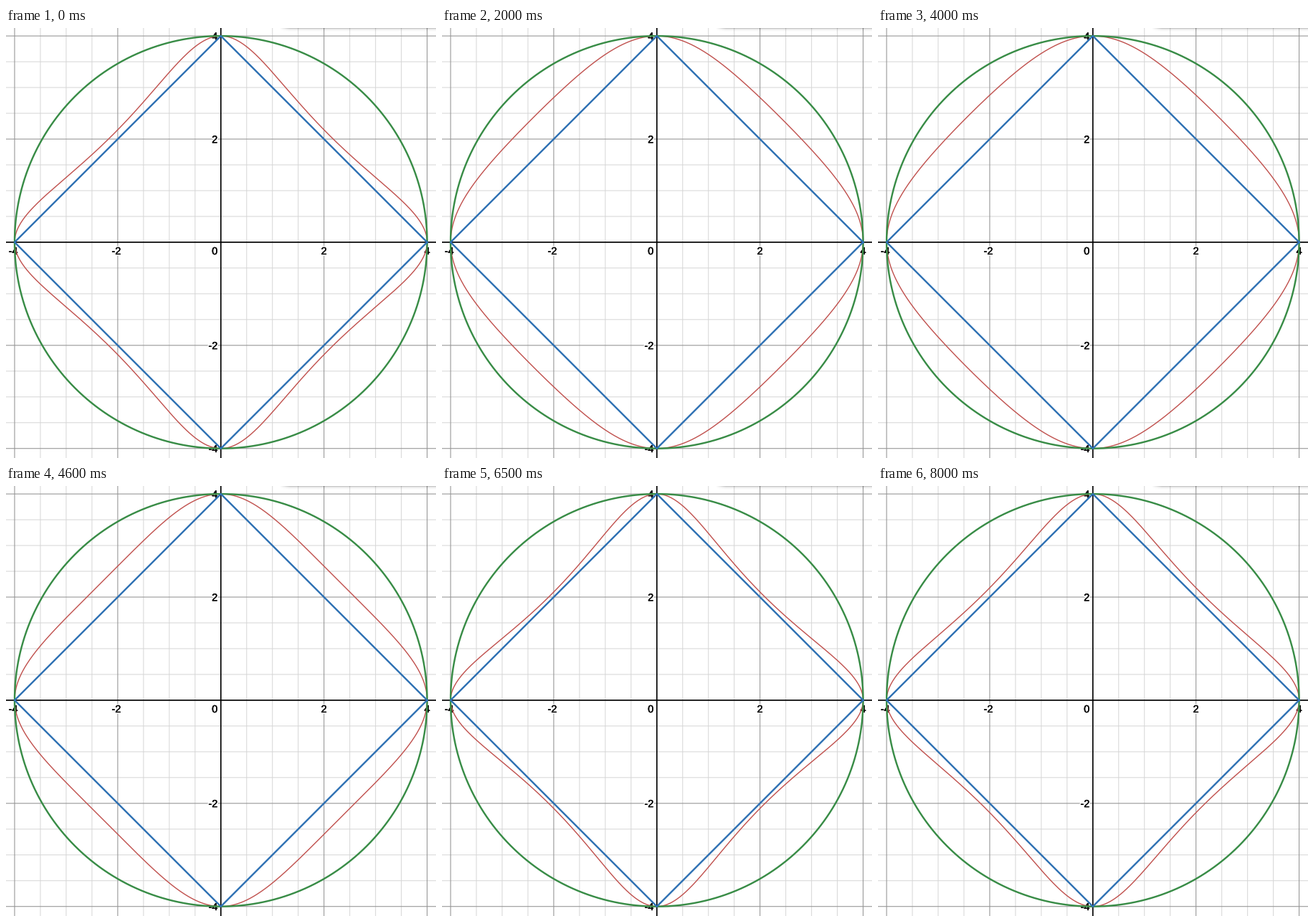
These frames come from a looping animation (600 by 600 pixels, 8100 ms). A matplotlib script:

```python
import numpy as np
import matplotlib.pyplot as plt
from matplotlib.animation import FuncAnimation
from matplotlib.patheffects import Normal, Stroke

SIZE, DPI = 600, 100
CX, CY, UNIT = 299.8, 298.9, 71.95
FRAMES, STEP_MS = 81, 100
PERIOD, ZERO_AT, K_MAX = 8.0, 3.05, 0.5
PX = 72 / DPI
THETA = np.linspace(0, 2 * np.pi, 721)

fig = plt.figure(figsize=(SIZE / DPI, SIZE / DPI), dpi=DPI, facecolor="white")
ax = fig.add_axes([0, 0, 1, 1])
ax.set(xlim=(0, SIZE), ylim=(SIZE, 0))
ax.axis("off")


def sx(x):
    return CX + UNIT * np.asarray(x)


def sy(y):
    return CY - UNIT * np.asarray(y)


def draw(xs, ys, color, width, z):
    line, = ax.plot(xs, ys, color=color, lw=width * PX, zorder=z, snap=False,
                    solid_joinstyle="round")
    return line


def rule(value, color, width, z):
    draw([sx(value)] * 2, [0, SIZE], color, width, z)
    draw([0, SIZE], [sy(value)] * 2, color, width, z)


def label(x, y, text, align="center"):
    ax.text(x, y, text, ha=align, va="center_baseline", color="black", zorder=4,
            family="Liberation Sans", size=14.5 * PX,
            path_effects=[Stroke(linewidth=3.5 * PX, foreground="white"),
                          Stroke(linewidth=0.4 * PX, foreground="black"),
                          Normal()])


def blend_radius(k):
    """Radius of x^2 + y^2 + k x^2 y^2 = 16 along each angle."""
    q = k * (np.cos(THETA) * np.sin(THETA)) ** 2
    return np.sqrt(32 / (1 + np.sqrt(1 + 64 * q)))


def slider(t):
    """Triangle wave from 0 to K_MAX and back."""
    phase = ((t - ZERO_AT) / PERIOD) % 1
    return K_MAX * (1 - abs(1 - 2 * phase))


for half in range(-8, 9):
    if half == 0:
        rule(0, "black", 1.7, 3)
    elif half % 4 == 0:
        rule(half / 2, "#979797", 1.1, 2)
    else:
        rule(half / 2, "#d6d6d6", 1.0, 1)

for n in (-4, -2, 2, 4):
    label(sx(n) - (2 if n < 0 else 0), 310.5, str(n))
    label(295.3, sy(n) - 0.2, str(n), "right")
label(295.3, 310.5, "0", "right")

# soft panel shadow along the top right edge
col, row = np.meshgrid(np.arange(380, SIZE) + 0.5, np.arange(5) + 0.5)
shadow = np.zeros(col.shape + (4,))
shadow[..., 3] = 0.3 * np.exp(-row / 1.5) * np.clip((col - 382) / 14, 0, 1)
ax.imshow(shadow, extent=(380, SIZE, 5, 0), aspect="auto", zorder=8,
          interpolation="nearest")
ax.set(xlim=(0, SIZE), ylim=(SIZE, 0))

blend = draw([], [], "#c0504d", 1.4, 5)
draw(sx(4 * np.cos(THETA)), sy(4 * np.sin(THETA)), "#388c46", 2.4, 6)
draw(sx([4, 0, -4, 0, 4]), sy([0, 4, 0, -4, 0]), "#2d70b3", 2.4, 7)


def update(frame):
    r = blend_radius(slider(frame * STEP_MS / 1000))
    blend.set_data(sx(r * np.cos(THETA)), sy(r * np.sin(THETA)))
    return blend,


anim = FuncAnimation(fig, update, frames=FRAMES, interval=STEP_MS, repeat=True,
                     repeat_delay=0)
plt.show()
```
